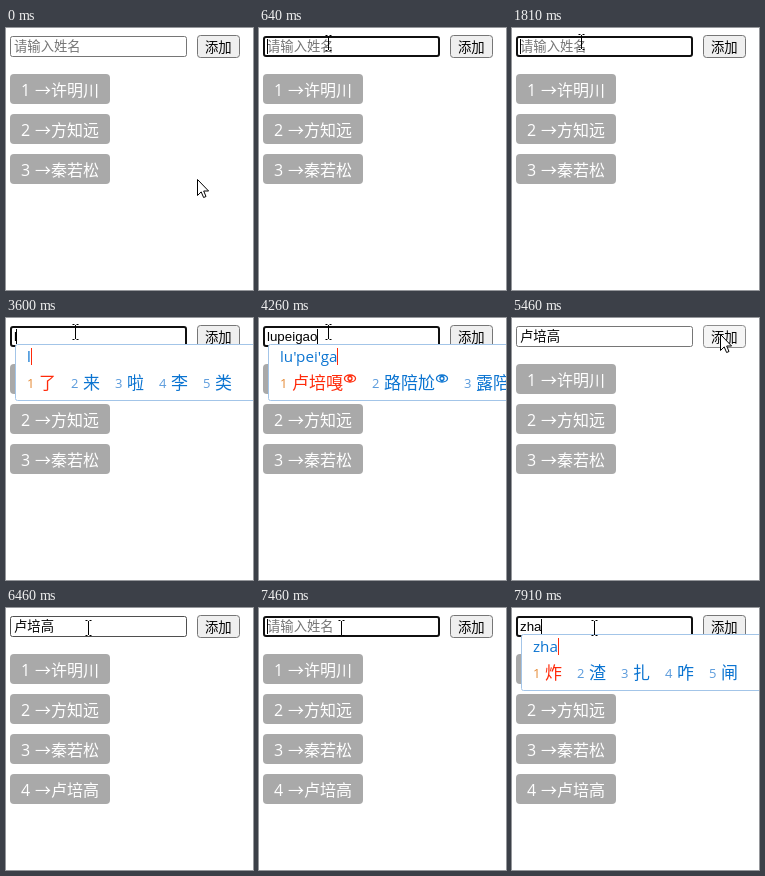
Write an HTML page with a canvas that moves like this. It is 247x262 px and loops after 8 s.

```html
<!DOCTYPE html>
<html lang="zh">
<head>
<meta charset="utf-8">
<style>
html, body { margin: 0; width: 100%; height: 100%; overflow: hidden; background: #fff; }
canvas { display: block; }
</style>
</head>
<body>
<canvas id="stage" width="247" height="262"></canvas>
<script>
const ctx = document.getElementById('stage').getContext('2d');
const LOOP = 8000;
const CJK = '"Noto Sans CJK SC", "Noto Sans CJK", sans-serif';
const ARIAL = '"Liberation Sans", "Noto Sans CJK SC", "Noto Sans CJK", sans-serif';
const OPEN = '"Open Sans", "Noto Sans", sans-serif';
const BLUE = '#0b74d1', RED = '#ff2a0a';
const NAMES = ['许明川', '方知远', '秦若松', '卢培高'];

// Each track lists [start time, ...values]; the latest started entry holds.
const POINTER = [
  [0, 'arrow', 191, 151], [120, 'arrow', 172, 122], [240, 'arrow', 112, 62],
  [360, 'arrow', 74, 29], [500, 'beam', 70, 16], [640, 'beam', 69, 15],
  [1220, 'beam', 69, 14], [4910, 'beam', 112, 20], [5040, 'arrow', 172, 30],
  [5160, 'arrow', 205, 30], [5310, 'arrow', 208, 16], [5760, 'arrow', 169, 75],
  [5910, 'arrow', 172, 84], [6170, 'arrow', 121, 52], [6320, 'beam', 84, 18],
  [6460, 'beam', 82, 20],
];
const FIELD = [
  [0, 'idle'], [500, 'hover'], [640, 'focus'], [5460, 'idle'], [6320, 'hover'], [6590, 'focus'],
];
const BUTTON = [[0, 'idle'], [5310, 'hover'], [5460, 'active'], [5610, 'hover'], [5760, 'idle']];
const CARET = [
  [0, false], [640, true], [1220, false], [1810, true], [2280, false], [2740, true],
  [3290, false], [3600, true], [4790, false], [5160, true], [5460, false],
  [6590, true], [7050, false], [7460, true],
];
const VALUE = [
  [0, ''], [3600, 'l'], [3750, 'lu'], [3870, 'lup'], [4020, 'lupei'], [4140, 'lupeig'],
  [4260, 'lupeigao'], [4380, NAMES[3]], [7460, ''], [7760, 'z'], [7910, 'zha'],
];
// An asterisk marks a candidate followed by the eye icon.
const COMPOSE = [
  [0, ''],
  [3600, 'l', '了 来 啦 李 类'],
  [3750, 'lu', '路 录 陆 鲁 露'],
  [3870, "lu'p", '路牌 路平 绿皮 路普'],
  [4020, "lu'pei", '卢培 路配 陆佩 鹿陪'],
  [4140, "lu'pei'g", '卢培刚* 路配个* 陆佩给*'],
  [4260, "lu'pei'ga", '卢培嘎* 路陪尬* 露陪改*'],
  [4380, ''],
  [7760, 'z', '在 这 中 做 怎'],
  [7910, 'zha', '炸 渣 扎 咋 闸'],
];
const at = (track, t) => track.findLast(entry => entry[0] <= t).slice(1);

function text(str, x, y, size, color, family = CJK) {
  ctx.font = `${size}px ${family}`;
  ctx.fillStyle = color;
  ctx.fillText(str, x, y);
  return ctx.measureText(str).width;
}

function rect(x, y, w, h, color) {
  ctx.fillStyle = color;
  ctx.fillRect(x, y, w, h);
}

function box(x, y, w, h, radius, fill, stroke, line = 1) {
  ctx.beginPath();
  const inset = stroke ? line / 2 : 0;
  ctx.roundRect(x + inset, y + inset, w - 2 * inset, h - 2 * inset, radius);
  ctx.fillStyle = fill;
  ctx.fill();
  if (!stroke) return;
  ctx.lineWidth = line;
  ctx.strokeStyle = stroke;
  ctx.stroke();
}

function drawField(t) {
  const [state] = at(FIELD, t), [value] = at(VALUE, t);
  const focused = state === 'focus';
  const border = { idle: '#767676', hover: '#4f4f4f', focus: '#101010' }[state];
  box(4, 8, 177, 21, 2, '#fff', border, focused ? 2 : 1);
  const selected = t >= 7050 && t < 7460;
  if (selected) rect(8, 10, 40, 17, '#0078d7');
  const color = selected ? '#fff' : value ? '#000' : '#757575';
  const width = text(value || '请输入姓名', 8, 23, 13.333, color, ARIAL);
  if (at(CARET, t)[0]) rect(8 + Math.floor(value ? width : 0), 11, 1, 15, '#000');
}

function drawButton(t) {
  const [fill, border] = {
    idle: ['#efefef', '#767676'], hover: ['#e5e5e5', '#4f4f4f'], active: ['#f5f5f5', '#8d8d8d'],
  }[at(BUTTON, t)[0]];
  box(191, 7, 43, 23, 3, fill, border);
  text('添加', 199, 23.5, 13.333, '#000');
}

function drawList(t) {
  NAMES.slice(0, t < 5610 ? 3 : 4).forEach((name, i) => {
    const y = 46 + 40 * i;
    box(4, y, 100, 30, 4, '#a9a9a9');
    text(i + 1, 15, y + 22, 16, '#fff', OPEN);
    text('→', 29, y + 22, 16, '#fff');
    text(name, 45, y + 22, 16, '#fff');
  });
}

function drawEye(x, y, color) {
  ctx.strokeStyle = color;
  ctx.lineWidth = 1.3;
  ctx.beginPath();
  ctx.ellipse(x + 6, y, 5.5, 3.5, 0, 0, 2 * Math.PI);
  ctx.moveTo(x + 8, y);
  ctx.arc(x + 6, y, 2, 0, 2 * Math.PI);
  ctx.stroke();
}

function drawCandidates(t) {
  const [letters, words] = at(COMPOSE, t);
  if (!letters) return;
  box(9, 26, 260, 57, 2, '#fff', '#a3c5e8');
  const width = text(letters, 21, 44, 15.2, BLUE, OPEN);
  rect(21 + Math.round(width), 30, 1, 17, RED);
  let x = 21;
  words.split(' ').forEach((word, i) => {
    const color = i ? BLUE : RED;
    const label = word.replace('*', '');
    text(i + 1, x, 69.5, 13, i ? '#5b9bdc' : '#e58a35', OPEN);
    text(label, x + 12, 71, 17, color);
    x += 12 + 17 * label.length;
    if (label !== word) {
      drawEye(x + 1, 60.5, color);
      x += 14;
    }
    x += 15;
  });
}

const ARROW = new Path2D('M.5.5V16.5L4.2 12.9 6.6 18.5 9 17.5 6.7 12H11.6Z');
const BEAM = new Path2D('M-3-7.5H-1M1-7.5H3M0-7V7M-3 7.5H-1M1 7.5H3');

function drawPointer(t) {
  const [kind, x, y] = at(POINTER, t);
  ctx.save();
  ctx.lineWidth = 1;
  ctx.strokeStyle = '#000';
  if (kind === 'arrow') {
    ctx.translate(x, y);
    ctx.fillStyle = '#fff';
    ctx.fill(ARROW);
    ctx.stroke(ARROW);
  } else {
    ctx.translate(x + .5, y);
    ctx.stroke(BEAM);
  }
  ctx.restore();
}

function draw(now) {
  const t = now % LOOP;
  rect(0, 0, 247, 262, '#fff');
  drawField(t);
  drawButton(t);
  drawList(t);
  drawCandidates(t);
  drawPointer(t);
}

const start = performance.now();
function tick() {
  draw(performance.now() - start);
  requestAnimationFrame(tick);
}
tick();
</script>
</body>
</html>
```
